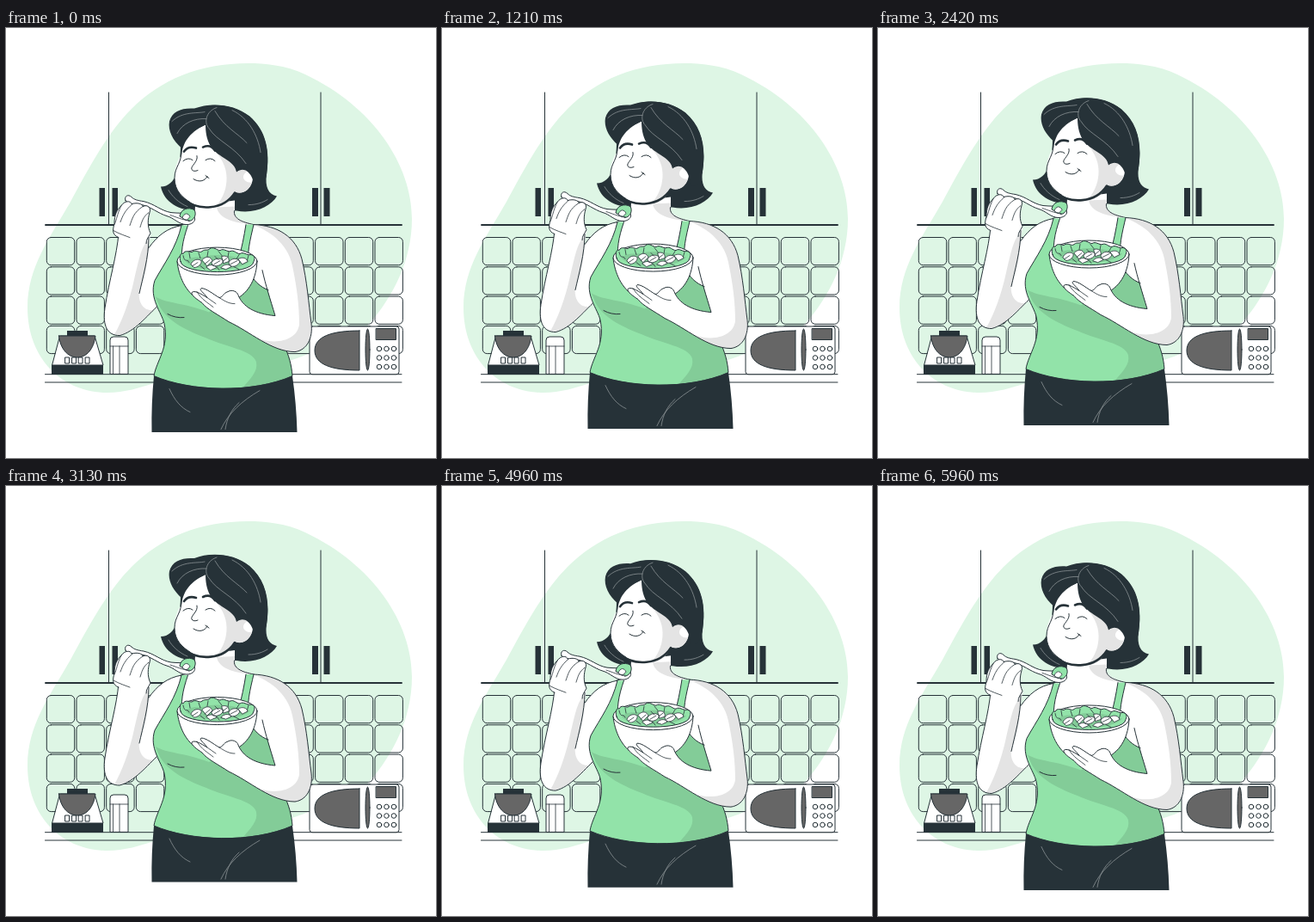
An HTML page for the animation above (6000 ms loop, 500x500 px).

```html
<!DOCTYPE html>
<html lang="en">
<head>
<meta charset="utf-8">
<title>Salad in the kitchen</title>
<style>
html, body { margin: 0; width: 100%; height: 100%; overflow: hidden; background: #fff }
svg { display: block; width: 100%; height: 100% }
.l { fill: none; stroke: #263238; stroke-linecap: round; stroke-linejoin: round }
.w { fill: #fff }
.g { fill: #92e3a9 }
.k { fill: #263238 }
.d { fill: #666 }
.s { fill: #e4e4e4 }
.m { fill: #83cc98 }
.f { fill: none; stroke: #8b9295; stroke-width: .8; stroke-linecap: round }
.t { stroke-width: .8 }
.b { stroke-width: 2.6 }
</style>
</head>
<body>
<svg viewBox="0 0 500 500">
  <path fill="#def6e5" d="M282 41C225 41 180 60 146 94C118 122 98 160 75 202C51 244 25 278 25 325C25 385 66 424 118 424C158 424 190 401 235 399C288 397 335 391 366 371C390 364 411 357 424 342C450 312 472 270 472 222C472 160 428 92 348 54C325 43 300 41 282 41Z"/>
  <g id="tiles" class="l"></g>
  <path class="l" d="M119.500 75V229M366 75V229M45.500 402.700H460M45.500 412H460"/>
  <path class="l" stroke-width="1.900" d="M46 229H460"/>
  <path class="k" d="M108.500 186h6.500v33h-6.500zM123.500 186h6.500v33h-6.500zM356 186h7v33h-7zM369.500 186h7v33h-7z"/>

  <!-- blender -->
  <path class="w l" d="M63 358H103L113 392H54Z"/>
  <path class="d l" d="M61.500 358H104C102 373 94 383 83 383S63 373 61.500 358Z"/>
  <path class="k" d="M71 352H95V358H71ZM53 392H113V403H53Z"/>
  <path class="w l" d="M69 383h4.500v7H69zM77 383h4.500v7H77zM84.500 383H89v7h-4.500zM92.500 383H97v7h-4.500z"/>

  <!-- shaker -->
  <path class="w l" d="M121 402V363Q121 359 125 359H138Q142 359 142 363V402Z"/>
  <path class="l t" d="M121 370H142M124.500 370V402M132 370V402"/>

  <!-- microwave -->
  <rect class="w l" x="353" y="347" width="104" height="55.700" rx="3"/>
  <path class="d l" d="M411 352V398C378 398 359 391 359 375S378 352 411 352Z"/>
  <ellipse class="d l" cx="420.500" cy="374" rx="2.500" ry="24"/>
  <rect class="d l" x="430.500" y="349.500" width="23" height="13"/>
  <g id="buttons" class="w l"></g>

  <g id="woman">
    <path class="k" d="M203 135C203 160 198 184 180 184C184 202 200 212 224 212H268C289 216 308 207 315 195C305 193 301 184 303 170C307 143 302 119 283 102C260 85 232 87 218 95Z"/>

    <!-- torso and raised arm -->
    <path class="w" d="M220 206C220 220 215 227 204 229L184 290L230 340L300 310L325 245C312 232 281 230 266 218V200Z"/>
    <path class="s" d="M245 208C247 218 258 226 288 228C270 224 264 220 266 207Z"/>
    <path class="l" d="M219.500 212C219 223 213 227 203 229M265.500 212C264 221 274 225 288 228"/>
    <path class="w" d="M204 229C187 232 176 241 166 255L168 238H131C129 264 120 292 115 325C112 346 118 357 132 357C149 353 164 334 180 320Z"/>
    <path class="s" d="M166 246C157 252 154 272 149 292C143 320 134 342 126 356C143 359 158 338 172 327C162 330 153 320 155 306C161 288 166 268 166 246Z"/>
    <path class="l" d="M204 229C187 232 176 241 166 255M131 238C129 264 120 292 115 325C112 346 118 357 132 357C149 353 164 334 178 321M166 243C166 266 159 290 155 308"/>

    <!-- top -->
    <path class="g" d="M204 229H211.500C205 248 203 260 205 278L228 308H276L270 270C274 256 277 241 279 228H288C284 246 279 262 283 282C287 293 296 301 305 304L313 335C318 362 332 380 333 404C286 425 214 422 172 404C175 386 190 371 184 343C181 330 166 314 173 293C184 273 198 255 204 229Z"/>
    <path class="m" d="M174 312C187 320 208 319 236 330L276 304L284 286C288 294 296 301 305 304C314 323 315 355 323 366C329 380 332 392 333 404C314 412 295 416 276 417C285 406 293 399 291 388C287 374 257 371 233 360C204 349 188 339 179 324Z"/>
    <path class="l" d="M188 332Q197 337 207 336M211.500 229C205 248 203 260 205 278M279 228C277 241 274 256 270 270M204 229C198 255 184 273 173 293C166 314 181 330 184 343C190 371 175 386 172 404C214 422 286 425 333 404C332 391 329 380 323 368"/>

    <path class="k" d="M172 404C214 422 286 424 333 404C336 425 338 447 338.500 469.500H169.500C169 447 170 425 172 404Z"/>
    <path class="f" d="M190 419C196 432 203 441 214 446M295 421C274 433 258 448 250 466M271 435C262 443 257 453 255 466"/>

    <!-- supporting upper arm -->
    <path class="w" d="M288 228C316 229 337 242 344 268L350 335H313L298 281Z"/>
    <path class="l" d="M288 228C284 246 279 262 283 282C287 293 296 301 305 304"/>

    <!-- bowl -->
    <path class="w l" d="M199 271C201 288 208 306 225 316H265C284 307 291 289 292 271Z"/>
    <ellipse class="w l" cx="245.500" cy="270.500" rx="46.500" ry="16"/>
    <path class="g l" d="M203 271C201 266 203 260 206 262C208 257 213 260 216 260C221 256 225 262 228 259C232 256 234 259 237 256C241 253 245 258 249 258C253 255 257 260 261 259C265 257 268 262 272 262C276 259 280 264 284 263C289 263 290 267 288 271C287 287 204 287 203 271Z"/>
    <path class="m" d="M209 271C216 263 228 268 237 264C252 262 270 266 284 270C271 284 219 284 209 271Z"/>
    <path class="l t" d="M206 264C208 274 210 266 213 272M213 261L214 267M224 261L226 267M235 259L234 265M247 259L251 264M259 260L258 266M271 263L268 268M282 264L280 271"/>
    <path class="w l t" d="M215 274c2-5 8-7 12-4c1 4-4 8-8 8zM228 269c5-5 10-4 12 1l-6 6zM239 272c3-5 10-6 14-2c-2 5-7 7-12 6zM251 265c6-2 9 2 8 6l-6 2zM259 272c2-5 10-6 13-1c-2 5-8 7-11 5zM270 268c5-3 10-1 11 3l-6 3zM233 277c4-3 9-3 12 1l-7 3zM250 278c3-4 9-5 12-1l-6 3z"/>
    <path class="l t" d="M217 276L223 272M231 274L237 269M242 274L249 270M253 270L257 267M261 274L269 270M243 265L247 269M226 276L231 280M245 277L248 281M265 277L271 280"/>

    <!-- supporting forearm -->
    <path class="w" d="M355 343C357 360 350 374 336 376C309 376 283 352 259 341C247 333 233 326 228 319C222 315 215 310 216 307C219 304 226 308 234 313C230 307 224 304 227 302C233 302 241 309 248 313C253 312 252 308 258 306C263 303 269 306 270 310C275 323 289 332 313 334L350 320Z"/>
    <path class="s" d="M289 229C316 229 337 242 344 268C350 293 352 320 355 343C357 360 350 374 336 376C322 376 308 369 295 361C316 368 339 362 341 344C341 322 338 301 334 281C330 252 309 237 289 229Z"/>
    <path class="l" d="M288 228C316 229 337 242 344 268C350 293 352 320 355 343C357 360 350 374 336 376C309 376 283 352 259 341C247 333 233 326 228 319C222 315 215 310 216 307C219 304 226 308 234 313C230 307 224 304 227 302C233 302 241 309 248 313C253 312 252 308 258 306C263 303 269 306 270 310C275 323 289 332 313 334C307 314 302 299 298 281"/>
    <path class="l t" d="M222 306C227 315 235 319 241 324M234 313L244 320M248 313C256 318 260 320 266 320"/>

    <!-- face -->
    <path class="w" d="M232 112C211 122 206 134 204 147C198 156 196 165 196 174C196 189 206 197 214 202C230 212 255 209 266 190C281 195 288 180 287 171C285 162 274 161 268 167C265 150 244 150 238 133Z"/>
    <path class="s" d="M243 143C251 149 265 151 268 166C272 163 278 162 283 165C271 170 276 180 286 179C282 190 273 193 266 190C261 202 253 207 243 208C258 193 264 164 243 143Z"/>
    <path class="l" d="M204 140C205 157 196 160 196 174C196 189 206 197 214 202"/>
    <path class="l b" d="M205 198C224 213 253 211 266 191M207 143Q212 136 221 139M229 138Q238 134 243 142"/>
    <path class="l" d="M222 148C224 155 214 160 216 164Q218 167 223 165M206 154Q212 149 217 153M232 153Q238 149 243 154M218 175C224 179 231 178 234 172M232 171L236 174"/>

    <!-- hair over the forehead -->
    <path class="k" d="M204 139C194 130 188 119 190 108C193 96 205 92 219 93C237 86 265 87 283 102C303 119 307 143 303 170C300 185 296 188 289 187C289 172 279 158 268 167C266 153 247 151 238 137C233 129 232 119 232 112C215 119 207 127 204 139Z"/>
    <path class="f" d="M193 108C205 96 222 99 231 97M199 122C205 110 219 104 233 105M245 92C232 96 230 110 236 116C245 131 266 137 279 157M243 96C254 115 270 122 280 133M263 95C282 104 293 124 296 144M189 188C193 195 201 203 211 207M282 205C292 205 299 202 304 199"/>

    <!-- spoon and hand -->
    <path class="w l" d="M139 200C137 195 142 192 146 196C149 199 153 200 160 201C173 204 180 212 192 214C200 215 208 214 215 216C223 219 220 228 210 228C201 228 195 220 187 218C177 215 168 207 158 205C150 204 142 205 139 200Z"/>
    <path class="g l" d="M202 218C203 210 212 207 219 211C222 216 219 223 213 224Z"/>
    <path class="w l t" d="M205 220C207 214 212 214 214 219L210 223ZM191 217C198 219 205 223 213 223"/>
    <path class="w l" d="M131 243C123 240 124 234 126 227C126 216 129 211 134 206C138 200 145 200 146 204C153 202 159 204 159 207C165 204 169 209 167 214C165 221 164 230 168 238C165 244 163 245 163 250"/>
    <path class="l t" d="M147 204C138 212 136 217 133 225M159 207C148 214 147 221 144 229M166 214C159 219 158 225 156 231M134 206C129 216 129 222 126 228M125 235C132 239 139 241 144 243"/>
  </g>
</svg>
<script>
const byId = id => document.getElementById(id);
const grid = (cols, rows, cell) => {
  let out = '';
  for (let r = 0; r < rows; r++) for (let c = 0; c < cols; c++) out += cell(c, r);
  return out;
};
byId('tiles').innerHTML = grid(12, 4, (c, r) =>
  `<rect x="${47.3 + c * 34.7}" y="${243.5 + r * 34.3}" width="32.4" height="32.2" rx="5"/>`);
byId('buttons').innerHTML = grid(3, 3, (c, r) =>
  `<circle cx="${434 + c * 8.5}" cy="${373 + r * 10.5}" r="2.8"/>`);

// She drifts up and back down at a steady pace.
const LOOP = 6000, RISE = 10, REST = 0.6, start = performance.now();
function draw(now) {
  const phase = Math.max(0, now - start) % LOOP / LOOP;
  const y = REST - RISE * (1 - Math.abs(1 - 2 * phase));
  byId('woman').setAttribute('transform', `translate(0 ${y})`);
  requestAnimationFrame(draw);
}
draw(start);
</script>
</body>
</html>
```
